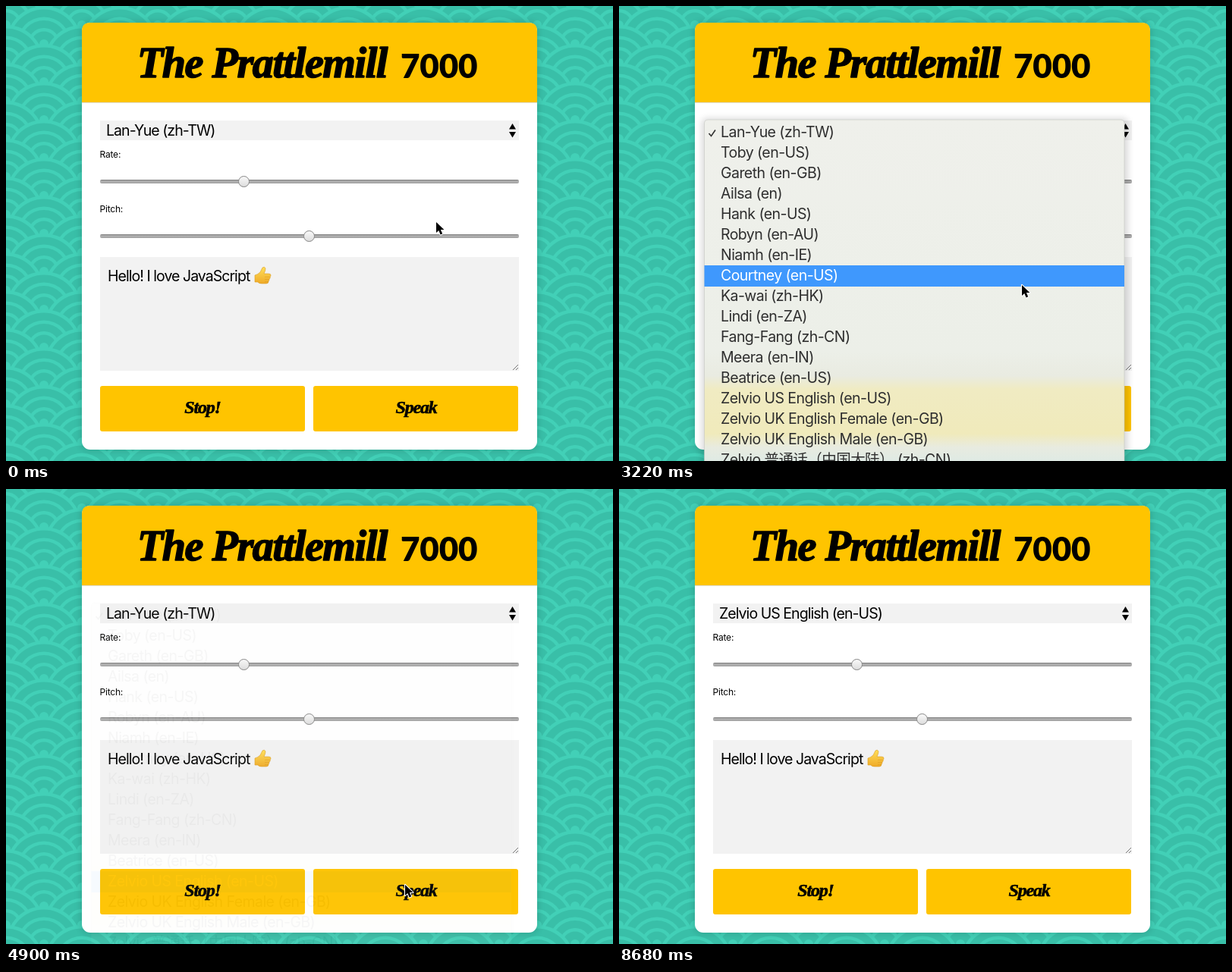
Recreate the animation shown at these times as an HTML page. Size 800 px wide and 600 px high, loop 8.75 s.

```html
<!DOCTYPE html>
<html lang="en">
<head>
<meta charset="utf-8">
<title>Speech demo</title>
<style>
  html, body { margin: 0; width: 100%; height: 100%; overflow: hidden; background: #3cc4ac; }
  svg { display: block; width: 800px; height: 600px; }
  text { white-space: pre; }
  .ui { font: 19.5px Inter, "Noto Sans CJK SC", "Noto Sans CJK", sans-serif; }
  .field { letter-spacing: -.95px; }
  .item { letter-spacing: -.55px; fill: #2e2e2e; }
  .label { font: 12px Inter, sans-serif; letter-spacing: -.2px; }
  .script { font: italic bold 56px "Liberation Serif", serif; letter-spacing: -1.4px;
    stroke: #000; stroke-width: 1.6; stroke-linejoin: round; }
  .number { font: 900 44px Lato, sans-serif; letter-spacing: -.2px; }
  .button { font-size: 24px; letter-spacing: -1.2px; stroke-width: .6; text-anchor: middle; }
</style>
</head>
<body>
<svg viewBox="0 0 800 600">
  <defs>
    <pattern id="waves" width="100" height="50" patternUnits="userSpaceOnUse"></pattern>
    <filter id="soft" x="-10%" y="-10%" width="120%" height="120%"><feGaussianBlur stdDeviation="4"/></filter>
    <linearGradient id="track" x2="0" y2="1">
      <stop offset="0" stop-color="#777"/><stop offset=".4" stop-color="#b4b4b4"/><stop offset="1" stop-color="#a0a0a0"/>
    </linearGradient>
    <linearGradient id="knob" x2="0" y2="1">
      <stop offset="0" stop-color="#fafafa"/><stop offset="1" stop-color="#dcdcdc"/>
    </linearGradient>
    <linearGradient id="skin" x2="0" y2="1">
      <stop offset="0" stop-color="#ffdf58"/><stop offset="1" stop-color="#efaa28"/>
    </linearGradient>
    <linearGradient id="glass" gradientUnits="userSpaceOnUse" x1="0" y1="150" x2="0" y2="600">
      <stop offset="0" stop-color="#eff0eb"/><stop offset=".68" stop-color="#ecefe8"/>
      <stop offset=".75" stop-color="#e9ebe1"/><stop offset=".79" stop-color="#f0ebc2"/>
      <stop offset=".92" stop-color="#f0eabb"/><stop offset=".96" stop-color="#e8ebe0"/>
      <stop offset="1" stop-color="#dfeae4"/>
    </linearGradient>
  </defs>

  <rect width="800" height="600" fill="url(#waves)"/>
  <rect x="98" y="20" width="604" height="567" rx="12" opacity=".12" filter="url(#soft)"/>
  <rect x="100" y="22" width="600" height="563" rx="11" fill="#fff"/>
  <path d="M100 127V33q0-11 11-11H689q11 0 11 11V127Z" fill="#ffc400"/>
  <path d="M100 127.5H700" stroke="#ddd"/>
  <text class="script" x="173" y="94">The Prattlemill</text>
  <text class="number" x="520" y="94.5">7000</text>

  <rect x="124" y="151" width="552" height="26" fill="#f2f2f2"/>
  <text id="value" class="ui field" x="132" y="171"></text>
  <path d="M663 162.5l4.5-7.5 4.5 7.5ZM663 166l4.5 7.5 4.5-7.5Z"/>
  <text class="label" x="123.5" y="200">Rate:</text>
  <text class="label" x="123.5" y="272">Pitch:</text>
  <g id="sliders"></g>

  <rect x="124" y="331" width="552" height="150" fill="#f2f2f2"/>
  <text class="ui field" x="134" y="363">Hello! I love JavaScript</text>
  <g transform="translate(327 344)" fill="url(#skin)" stroke="#d99a22" stroke-width=".6">
    <path d="M1 11q4-1 7-4l3-6q3-2 4 1 0 3-2 7h6q3 0 3 2 0 2-1 2 1 2-1 3 0 2-1 3 0 3-3 3H10q-4 0-5-2H1Z"/>
    <path d="M14 13.2h6.5M14 16.4h6M14 19.4h5" fill="none"/>
  </g>
  <path d="M668 480l7-7M672 480l3-3" stroke="#777"/>

  <g fill="#ffc400">
    <rect x="124" y="501" width="270" height="60" rx="3"/>
    <rect x="405" y="501" width="270" height="60" rx="3"/>
  </g>
  <text class="script button" x="259" y="537">Stop!</text>
  <text class="script button" x="540.5" y="537">Speak</text>

  <g id="menu">
    <rect x="109" y="148" width="562" height="470" rx="6" opacity=".14" filter="url(#soft)"/>
    <path d="M112.500 610V155q0-5 5-5H661q5 0 5 5V610Z" fill="url(#glass)" stroke="#c4c7c2" stroke-width=".6"/>
    <rect id="bar" x="112.500" width="553.500" height="28" fill="#3f98fd"/>
    <path id="tick" d="M118.500 168l3 3.500 5.500-8" fill="none" stroke="#333" stroke-width="1.600"/>
    <g id="items"></g>
  </g>

  <g id="cursor" stroke-linejoin="round">
    <path id="arrow" d="M0 0V14l3.300-3 2.300 5.400 2.600-1.100-2.300-5.300h4.500Z" stroke="#fff" stroke-width="2.200" paint-order="stroke"/>
    <path id="hand" d="M0 1.500Q0-.5 1.500-.5T3.500 1.500L4.800 6Q6 4.500 7.200 6 8.800 5 9.800 6.600 12 6 12 9v4l-1.500 3v2H3v-2L-2.500 10.500q-1-2 1-2.300L1.500 9.500Z" fill="#fff" stroke="#000" stroke-width="1.100"/>
  </g>
</svg>

<script>
const LOOP = 8750, STEP = 70;
const ROW = 27, TOP = 154;
const OPEN = 1470, BLINK = 4550, FADE = 4690, CLOSED = 4970;

const voices = [
  "Lan-Yue (zh-TW)", "Toby (en-US)", "Gareth (en-GB)", "Ailsa (en)", "Hank (en-US)",
  "Robyn (en-AU)", "Niamh (en-IE)", "Courtney (en-US)", "Ka-wai (zh-HK)", "Lindi (en-ZA)",
  "Fang-Fang (zh-CN)", "Meera (en-IN)", "Beatrice (en-US)", "Zelvio US English (en-US)",
  "Zelvio UK English Female (en-GB)", "Zelvio UK English Male (en-GB)",
  "Zelvio 普通话（中国大陆） (zh-CN)"
];

// time, x, y of the pointer tip; the last value eases the way there
const path = [
  [0, 567, 285], [910, 567, 285], [1400, 548, 166, 1], [1740, 543, 166],
  [2380, 536, 253], [3220, 531, 368], [4340, 526, 522], [6160, 526, 522],
  [6860, 325, 535, 1], [7770, 325, 535], [8330, 322, 622, 1], [LOOP, 322, 622]
];

const $ = id => document.getElementById(id);

function add(parent, name, attrs, text = "") {
  const el = document.createElementNS("http://www.w3.org/2000/svg", name);
  for (const key in attrs) el.setAttribute(key, attrs[key]);
  el.textContent = text;
  return parent.appendChild(el);
}

// overlapping scales, lower rows in front
const rings = [50, 45.5, 35.5, 31, 21, 16.5, 6];
for (let row = 0; row < 4; row++) {
  for (const cx of row % 2 ? [0, 100] : [50]) {
    rings.forEach((r, i) =>
      add($("waves"), "circle", { cx, cy: row * 25, r, fill: i % 2 ? "#39bfa8" : "#42d0b7" }));
  }
}

for (const [x, y] of [[313.5, 231.5], [399.5, 303.5]]) {
  add($("sliders"), "rect", { x: 124, y: y - 2.5, width: 552, height: 5, rx: 2, fill: "url(#track)" });
  add($("sliders"), "circle", { cx: x, cy: y, r: 7, fill: "url(#knob)", stroke: "#858585" });
}

const items = voices.map((name, i) =>
  add($("items"), "text", { class: "ui item", x: 134, y: TOP + 19 + i * ROW }, name));

function pointer(t) {
  const i = path.findIndex(p => p[0] > t);
  const [t0, x0, y0] = path[i - 1], [t1, x1, y1, ease] = path[i];
  let k = (t - t0) / (t1 - t0);
  if (ease) k *= k * (3 - 2 * k);
  return [x0 + (x1 - x0) * k, y0 + (y1 - y0) * k];
}

const show = (el, on) => { el.style.display = on ? "" : "none"; };

function draw(t) {
  const [x, y] = pointer(t);
  const open = t >= OPEN && t < CLOSED;
  const blink = t >= BLINK && t < FADE;
  const active = blink ? -1 : Math.floor((y - TOP) / ROW);

  show($("menu"), open);
  $("menu").style.opacity = t < FADE ? 1 : Math.max(.04, 1 - (t - FADE) / 210);
  show($("bar"), active >= 0);
  $("bar").setAttribute("y", TOP - 1 + active * ROW);
  $("tick").style.stroke = active === 0 ? "#fff" : "";
  items.forEach((el, i) => { el.style.fill = i === active ? "#fff" : ""; });
  $("value").textContent = voices[t < CLOSED ? 0 : 13];

  const onButton = y > 501 && y < 561 && (x > 124 && x < 394 || x > 405 && x < 675);
  const hand = onButton && t >= CLOSED;
  show($("hand"), hand);
  show($("arrow"), !hand);
  $("cursor").setAttribute("transform", `translate(${x} ${y})`);
}

const start = performance.now();
function tick() {
  const t = Math.max(0, performance.now() - start) % LOOP;
  draw(Math.floor(t / STEP) * STEP);
  requestAnimationFrame(tick);
}
tick();
</script>
</body>
</html>
```
